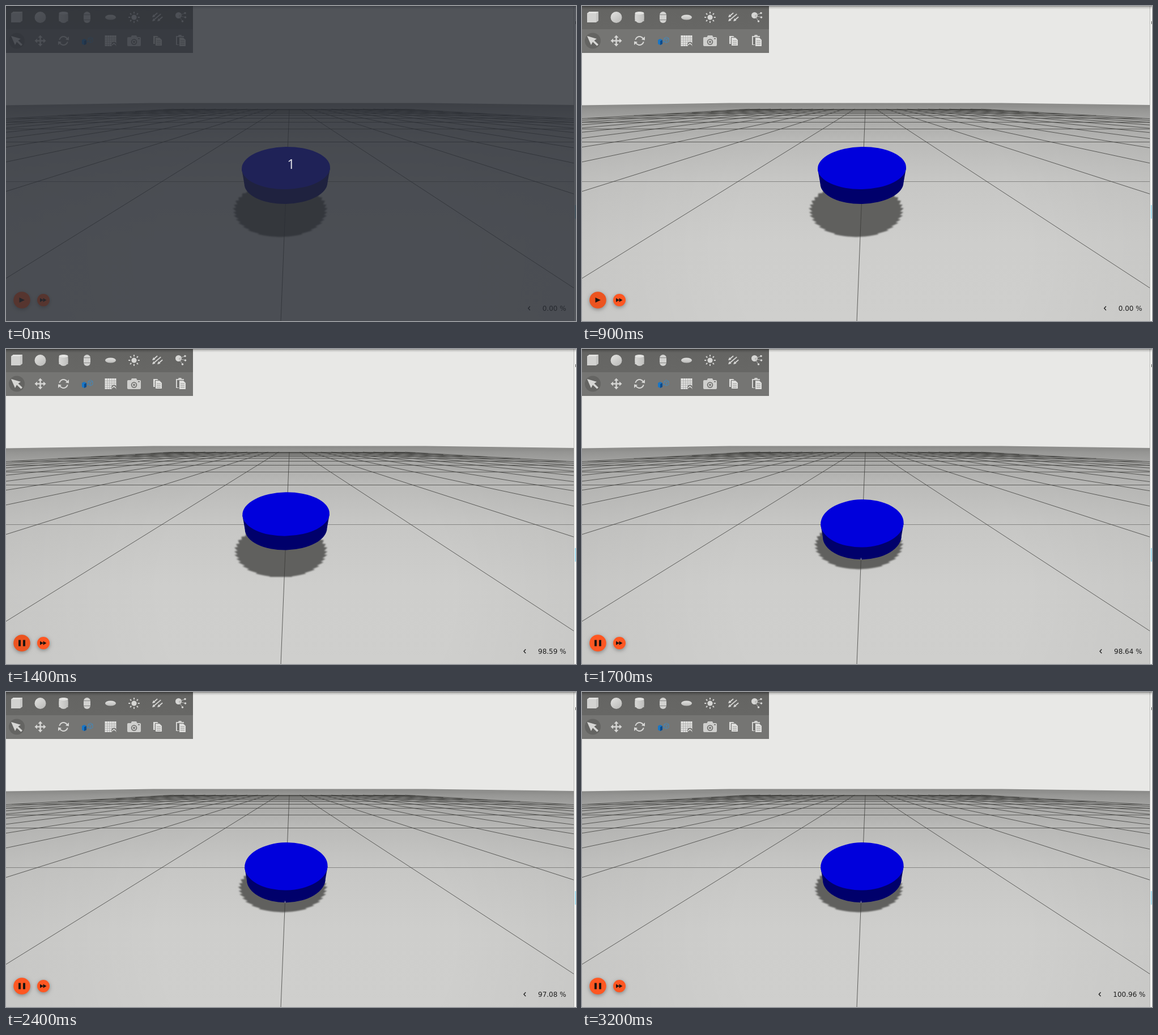
Write an HTML page with a canvas that moves like this. It is 1006x557 px and loops after 3.3 s.

```html
<!DOCTYPE html>
<html lang="en">
<head>
<meta charset="utf-8">
<title>Falling disc</title>
<style>
  html, body { margin: 0; width: 100%; height: 100%; overflow: hidden; }
  canvas { display: block; }
</style>
</head>
<body>
<canvas id="stage" width="1006" height="557"></canvas>
<script>
const ctx = document.getElementById('stage').getContext('2d');
const W = 1006, H = 557, LOOP = 3300, STEP = 100;
const ICON = '#d6d6d4';
// Real-time factor, one reading per step from 1200 ms on.
const RATES = [0, 100.21, 98.59, 99.42, 100.37, 98.64, 99.17, 100.48, 98.92, 97.85, 100.12,
  98.33, 97.08, 98.76, 100.25, 99.31, 98.47, 99.64, 98.85, 100.18, 100.96];

const mix = (a, b, p) => a + (b - a) * p;

function rect(color, x, y, w, h) {
  ctx.fillStyle = color;
  ctx.fillRect(x, y, w, h);
}
function trace(points, close) {
  ctx.beginPath();
  for (let i = 0; i < points.length; i += 2) ctx.lineTo(points[i], points[i + 1]);
  if (close) ctx.closePath();
}
function poly(color, ...points) {
  trace(points, true);
  ctx.fillStyle = color;
  ctx.fill();
}
function line(color, width, ...points) {
  trace(points);
  ctx.strokeStyle = color;
  ctx.lineWidth = width;
  ctx.stroke();
}
function oval(color, x, y, rx, ry = rx, turn = 0) {
  ctx.beginPath();
  ctx.ellipse(x, y, rx, ry, turn, 0, 7);
  ctx.fillStyle = color;
  ctx.fill();
}
function pill(color, x, y, w, h, r) {
  ctx.beginPath();
  ctx.roundRect(x, y, w, h, r);
  ctx.fillStyle = color;
  ctx.fill();
}
function fade(x0, y0, x1, y1, ...stops) {
  const g = ctx.createLinearGradient(x0, y0, x1, y1);
  for (let i = 0; i < stops.length; i += 2) g.addColorStop(stops[i], stops[i + 1]);
  return g;
}
function at(x, y, draw, turn = 0) {
  ctx.save();
  ctx.translate(x, y);
  ctx.rotate(turn);
  draw();
  ctx.restore();
}
function around(x, y, count, draw) {
  for (let i = 0; i < count; i++) at(x, y, draw, i * 2 * Math.PI / count);
}

function drawGround() {
  rect('#e8e8e6', 0, 0, W, H);
  poly(fade(0, 171, 0, H, 0, '#888886', .03, '#9a9a98', .075, '#a9a9a7',
    .18, '#bbbbb9', .36, '#c7c7c5', .64, '#cececc', 1, '#cfcfcd'),
    0, 175.5, 260, 171.5, 740, 171.5, 1003, 175, 1003, H, 0, H);
  const edge = ctx.createRadialGradient(530, 430, 250, 530, 430, 720);
  edge.addColorStop(0, 'rgba(0,0,0,0)');
  edge.addColorStop(1, 'rgba(0,0,0,.06)');
  rect(edge, 0, 176, W, H);
}

function drawGrid() {
  const vx = 500.5, vy = 170.3, reach = 142.1, last = 11;
  const slope = k => -.04 + 1.568 * k;
  const far = reach / (last + 1.01);
  for (let n = 0; n <= last; n++) {
    const dy = reach / (n + 1.01), y = Math.floor(vy + dy) + .5;
    line(n ? 'rgba(60,60,58,.72)' : 'rgba(70,70,68,.5)', 1,
      vx + slope(-last) * dy, y, vx + slope(last) * dy, y);
  }
  for (let k = -last; k <= last; k++) {
    line('rgba(55,55,53,.75)', 1, vx + slope(k) * far, vy + far, vx + slope(k) * 390, vy + 390);
  }
}

function drawShadow(p) {
  const cx = mix(484, 488.5, p), cy = mix(361, 346.5, p);
  const rx = mix(79, 74, p), ry = mix(47.5, 43, p);
  const left = [], right = [];
  for (let dy = -ry; dy <= ry; dy++) {
    const half = rx * Math.sqrt(1 - (dy / ry) ** 2);
    const y = cy + dy, tooth = 7 * (1 - (y % 6.5) / 6.5);
    left.push(cx - half - tooth + 2, y);
    right.unshift(cx + half + tooth - 2, y);
  }
  for (let i = 0; i < right.length; i += 2) left.push(right[i], right[i + 1]);
  // The right side was collected back to front, so restore its x, y order.
  const n = left.length / 2;
  ctx.save();
  ctx.filter = 'blur(1.2px)';
  poly('#60605e', ...left.slice(0, n), ...pairSwap(left.slice(n)));
  ctx.restore();
}
function pairSwap(list) {
  return list.map((v, i) => list[i ^ 1]).some(Number.isNaN) ? [] : list;
}

function drawDisc(p) {
  const x = mix(494, 494.4, p), top = mix(286.5, 308.3, p), base = mix(313, 331, p);
  const rx = mix(78, 73.2, p), ry = mix(37.5, 42.2, p);
  const rb = mix(73.5, 69.5, p), side = '#00006b';
  oval(side, x, base, rb, mix(37, 41.2, p), -.02);
  poly(side, x - rx, top + 2, x + rx, top, x + rb, base - 1, x - rb, base + 1);
  oval('#0000dc', x, top, rx, ry, -.02);
  if (p === 1) line('#b0b0ae', 1, 492.5, 369.5, 492.5, 373);
}

function drawShapeIcons() {
  poly('#c6c6c4', 9, 13, 13, 10, 29, 10, 29, 26, 25, 29, 9, 29);
  rect('#d2d2d0', 9, 13, 16, 16);
  poly('#e2e2e0', 9, 13, 13, 10, 29, 10, 25, 13);
  oval(fade(54, 12, 66, 29, 0, '#dededc', 1, '#bdbdbb'), 60.5, 20, 10);
  pill(fade(93, 0, 110, 0, 0, '#d8d8d6', 1, '#bebebc'), 93.5, 10, 16, 20, [8, 8, 8, 8]);
  rect(fade(93, 0, 110, 0, 0, '#d8d8d6', 1, '#bebebc'), 93.5, 13, 16, 14);
  oval('#e4e4e2', 101.5, 12.5, 8, 2.5);
  pill('#d2d2d0', 137, 10, 12, 20, 6);
  rect('#878785', 137, 15, 12, 1);
  rect('#878785', 137, 24, 12, 1);
  oval(fade(0, 15, 0, 25, 0, '#e4e4e2', 1, '#b8b8b6'), 184.5, 20, 9.5, 4.5);
  oval(ICON, 226, 20, 4.6);
  around(226, 20, 8, () => line(ICON, 2, 6.8, 0, 9.8, 0));
  for (const [x, y, len] of [[258, 20, 12], [258, 27, 20], [267, 27, 12]]) {
    at(x, y, () => {
      line(ICON, 1.8, 2, 0, len, 0);
      poly(ICON, 0, 0, 5, -2.5, 5, 2.5);
    }, -.7);
  }
  oval(ICON, 304.5, 16.5, 5.5);
  for (const [x, y] of [[316, 12.5], [316.5, 20], [311.5, 27]]) {
    line('#b4b4b2', 1, 305, 17, x, y);
    oval(ICON, x, y, 1.8);
  }
}

function drawToolIcons() {
  oval('#646462', 19, 61.5, 14);
  poly(ICON, 9, 53, 26, 58, 21.5, 61, 29, 68, 26.5, 70.5, 19, 63.5, 16, 69);
  around(60.5, 61.5, 4, () => {
    poly(ICON, 10, 0, 5.5, -4, 5.5, 4);
    rect(ICON, 0, -1.2, 6, 2.4);
  });
  around(101.5, 61.5, 2, () => {
    ctx.beginPath();
    ctx.arc(0, 0, 7.5, -2.9, -.5);
    ctx.strokeStyle = ICON;
    ctx.lineWidth = 2;
    ctx.stroke();
    poly(ICON, 9.5, -7.5, 9.5, -1, 3.5, -2);
  });
  poly('#1976c5', 134, 60, 138, 58, 142, 60, 142, 67, 138, 69, 134, 67);
  poly('#0c4b8c', 138, 62, 142, 60, 142, 67, 138, 69);
  line('#2b7fc4', 1, 142, 64, 147, 62);
  line('#4687b8', 1, 145, 57, 149, 55, 153, 57, 153, 63, 149, 65, 145, 63, 145, 57, 149, 59, 153, 57);
  line('#4687b8', 1, 149, 59, 149, 65);
  rect('#e4e4e2', 174.5, 52, 20, 19);
  for (let i = 1; i < 5; i++) {
    rect('#a4a4a2', 174.5 + i * 4, 52, .8, 19);
    rect('#a4a4a2', 174.5, 52 + i * 3.9, 20, .8);
  }
  oval('#757573', 190.5, 68, 4.5);
  line('#e4e4e2', 1.5, 187, 69, 190.5, 66, 194, 69);
  pill('#cfcfcd', 214, 55, 24, 16, 2);
  poly('#cfcfcd', 220, 56, 222, 52, 230, 52, 232, 56);
  oval('#666664', 226, 63.5, 5.2);
  oval('#cfcfcd', 226, 63.5, 3.7);
  oval('#777775', 226, 63.5, 2);
  rect('#666664', 233, 57, 3, 1.5);
  page(260, 53);
  page(264, 56);
  rect('#d2d2d0', 300, 53, 14, 16);
  rect('#70706e', 302, 55, 10, 13);
  pill('#d2d2d0', 304, 51, 6, 4, 1.5);
  page(306, 56, 11, 15);
}
function page(x, y, w = 11, h = 14) {
  rect('#757573', x - 1, y - 1, w + 1, h + 1);
  poly('#dededc', x, y, x + w - 4, y, x + w, y + 4, x + w, y + h, x, y + h);
  for (let i = 5; i < h - 1; i += 3) rect('#a2a2a0', x + 2, y + i, w - 4, 1);
}

function drawToolbar() {
  rect(fade(0, 0, 0, 41, 0, '#5f5f5d', .2, '#656563', 1, '#676765'), 0, 0, 330, 41);
  rect('#757573', 0, 41, 330, 42);
  drawShapeIcons();
  drawToolIcons();
}

function drawButton(color, x, y, r) {
  ctx.save();
  ctx.shadowColor = 'rgba(0,0,0,.35)';
  ctx.shadowBlur = 7;
  ctx.shadowOffsetY = 2;
  oval(color, x, y, r);
  ctx.restore();
}
function drawControls(t) {
  const hover = t >= 900 && t < 1500;
  drawButton(hover ? '#ec5420' : '#ff5722', 28, 520, 14.8);
  drawButton('#ff5722', 66, 520, 11);
  const ink = '#1c1410';
  if (t < 1200) poly(ink, 23.5, 515.5, 33, 520, 23.5, 524.5);
  else {
    rect(ink, 22, 514.5, 4, 11);
    rect(ink, 30, 514.5, 4, 11);
  }
  poly(ink, 60, 516.5, 66, 520, 60, 523.5);
  poly(ink, 65.5, 516.5, 71.5, 520, 65.5, 523.5);
}

function drawRate(t) {
  const rate = t < 1200 ? 0 : RATES[(t - 1200) / STEP];
  const x = rate >= 100 ? 937.3 : rate >= 10 ? 939 : 946.7;
  ctx.font = '12px "DejaVu Sans", sans-serif';
  ctx.textAlign = 'left';
  ctx.fillStyle = '#1e1e1e';
  ctx.fillText(rate.toFixed(2) + ' %', x, 539);
  line('#1e1e1e', 1.3, x - 21.8, 531, x - 25, 534.5, x - 21.8, 538);
}

function drawFrame() {
  rect('#b4b4b2', 1002, 0, 1, H);
  rect('#f7f7f5', 1003, 0, 3, H);
  rect('#a9dff0', 1004, 352, 2, 24);
  rect('#555', 1005, 27, 1, 5);
  rect(fade(0, 0, 0, 6, 0, 'rgba(0,0,0,.4)', .4, 'rgba(0,0,0,.14)', 1, 'rgba(0,0,0,0)'), 0, 0, W, 6);
}

function drawCountdown() {
  rect('rgba(40,44,52,.785)', 0, 0, W, H);
  ctx.font = '24px "Open Sans", sans-serif';
  ctx.textAlign = 'center';
  ctx.fillStyle = '#e6e6ea';
  ctx.fillText('1', 503, 288);
}

function render(now) {
  const t = Math.floor(now % LOOP / STEP) * STEP;
  const fall = Math.min(1, Math.max(0, (t - 1300) / 200)) ** 2;
  drawGround();
  drawShadow(fall);
  drawGrid();
  drawDisc(fall);
  drawToolbar();
  drawFrame();
  drawControls(t);
  drawRate(t);
  if (t < 100) drawCountdown();
}

const start = performance.now();
function tick() {
  render(performance.now() - start);
  requestAnimationFrame(tick);
}
tick();
</script>
</body>
</html>
```
